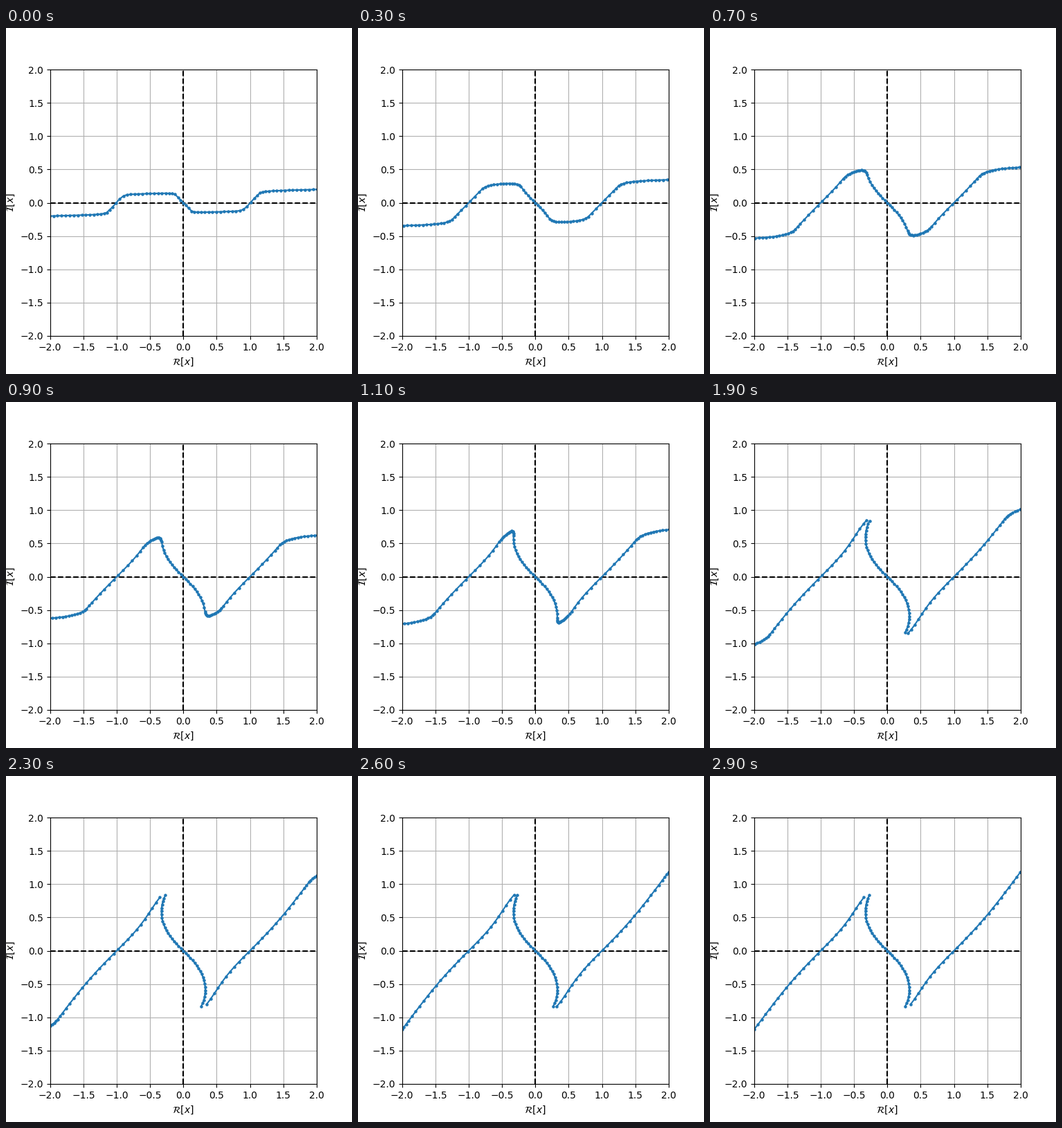
Animation, 500 px wide and 500 px high, one loop 3 s. Source, as a matplotlib script:

```python
import numpy as np
import matplotlib.pyplot as plt
from matplotlib.animation import FuncAnimation

FRAMES = 30
INTERVAL = 100      # ms
WARMUP = 3          # flow steps already taken at the first frame
STEP = 0.05         # path length per flow step
MAX_GAP = 0.1       # longer segments are split in half
CUTOFF = 5.0        # points beyond this height are dropped


def action(z):
    w = 1 + z * z
    return w + 4 / w


def d_action(z):
    w = 1 + z * z
    return 2 * z * (1 - 4 / (w * w))


def flow(z):
    """Move every point a fixed distance along the steepest descent."""
    g = d_action(z)
    z = z + STEP * 1j * np.conj(g) / (np.abs(g) + 1e-12)
    z[action(z).imag > CUTOFF] = np.nan
    return z


def split(z):
    """Insert a midpoint into each segment that has grown too long."""
    long = np.flatnonzero(np.abs(np.diff(z)) > MAX_GAP)
    return np.insert(z, long + 1, (z[long] + z[long + 1]) / 2)


def contours():
    z = np.linspace(-2, 2, 65) * (1 + 0.025j)
    history = []
    for _ in range(WARMUP + FRAMES - 1):
        z = split(flow(z))
        history.append(z)
    return history[WARMUP - 1:]


paths = contours()

fig, ax = plt.subplots(figsize=(5, 5), dpi=100)
ax.set_aspect("equal")
ax.set_xlim(-2, 2)
ax.set_ylim(-2, 2)
ticks = np.arange(-2, 2.1, 0.5)
ax.set_xticks(ticks)
ax.set_yticks(ticks)
ax.set_xlabel(r"$\mathcal{R}[x]$")
ax.set_ylabel(r"$\mathcal{I}[x]$")
ax.grid()
ax.axhline(0, color="k", ls="--")
ax.axvline(0, color="k", ls="--")
curve, = ax.plot([], [], ".-", color="C0", ms=4.5, lw=1.5)


def update(i):
    z = paths[i]
    curve.set_data(z.real, z.imag)
    return curve,


anim = FuncAnimation(fig, update, frames=FRAMES, interval=INTERVAL,
                     repeat=True, repeat_delay=0)
plt.show()
```
